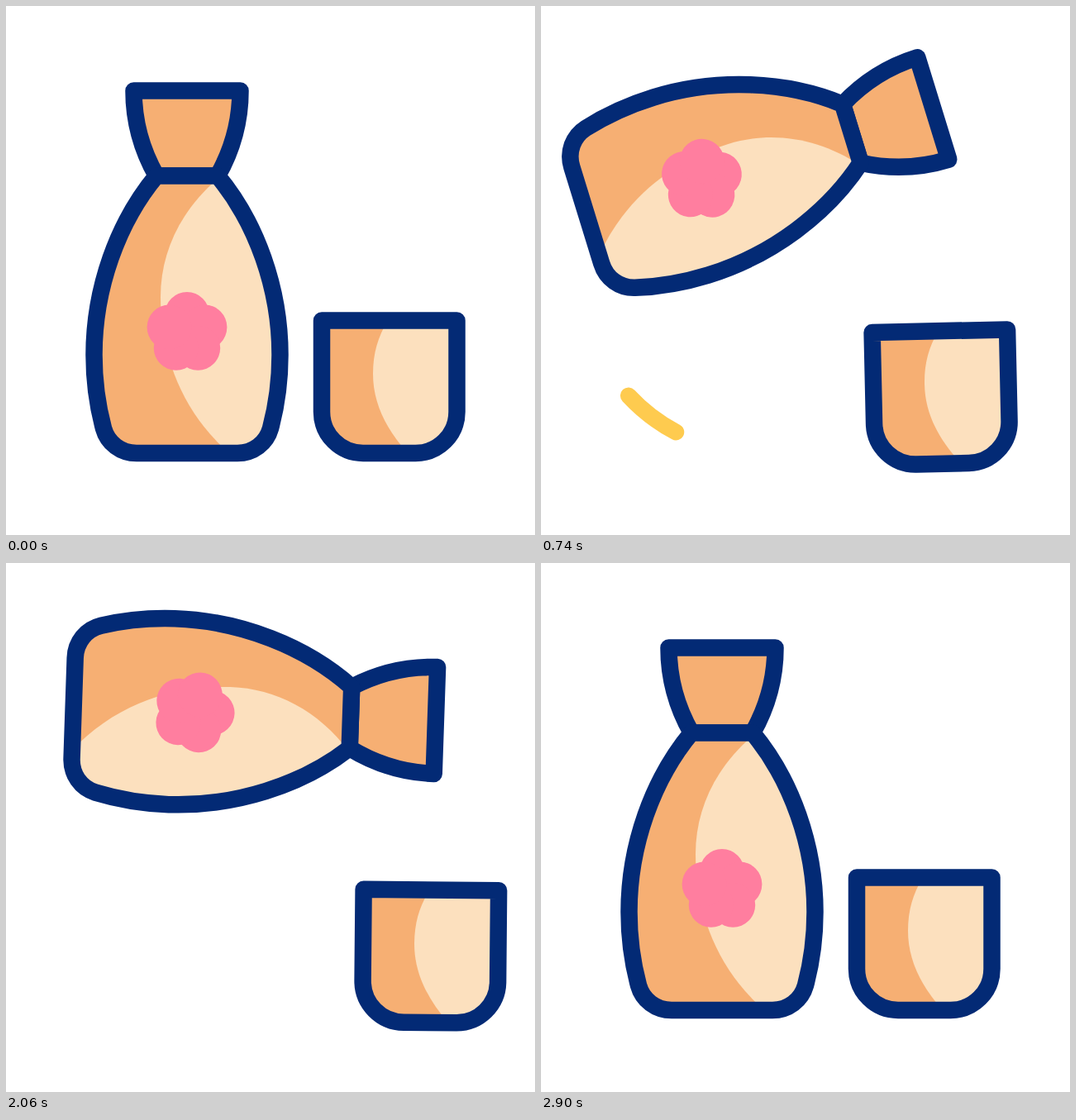
These frames come from a looping animation (640x640 px, 3580 ms). An HTML page:

```html
<!DOCTYPE html>
<html lang="en">
<head>
<meta charset="utf-8">
<title>Sake pour</title>
<style>
  html, body { margin: 0; width: 100%; height: 100%; overflow: hidden; background: #fff; }
  svg { display: block; width: 100%; height: 100%; }
  .line { fill: none; stroke-width: 20; stroke-linecap: round; stroke-linejoin: round; }
  .ink { stroke: #032a75; stroke-width: 20.5; }
  .shade { fill: #f6af73; }
  .light { fill: #fce0be; }
</style>
</head>
<body>
<svg viewBox="0 0 640 640">
  <defs>
    <path id="body" d="M182 205.5C135 262 106.5 342 106.5 422Q106.5 468 118 511C123 529 139 541 158 541H280C299 541 315 529 320 511Q331.5 468 331.5 422C331.5 342 303 262 256 205.5Z"/>
    <path id="bowl" d="M382 380.5H545.5V491a50 50 0 0 1-50 50H432a50 50 0 0 1-50-50Z"/>
    <clipPath id="inBody"><use href="#body"/></clipPath>
    <clipPath id="inBowl"><use href="#bowl"/></clipPath>
  </defs>
  <path id="water" class="line" stroke="#95b2f5" pathLength="1"
    d="M534 243.5C553 243.5 563 285 563 330Q563 390 557 450"/>
  <path id="swoosh" class="line" stroke="#fecb4f"/>
  <g id="bottle">
    <path class="line ink" style="fill:#f6af73" d="M154.5 102.5H283.5Q283.5 157 256 205.5H182Q154.5 157 154.5 102.5Z"/>
    <use href="#body" class="shade"/>
    <path class="light" clip-path="url(#inBody)" d="M260 206C212 245 187 297 187 352C187 424 214 492 270 541H340V206Z"/>
    <g id="flower" fill="#ff7e9f"></g>
    <use href="#body" class="line ink"/>
  </g>
  <g id="cup">
    <use href="#bowl" class="shade"/>
    <path class="light" clip-path="url(#inBowl)" d="M462 380.5C450 400 444 420 444 445C444 478 458 510 486 541H550V380.5Z"/>
    <use href="#bowl" class="line ink"/>
  </g>
</svg>
<script>
const LOOP = 3580;
const $ = id => document.getElementById(id);
const clamp = (v, lo, hi) => Math.min(hi, Math.max(lo, v));
const rad = deg => deg * Math.PI / 180;
const onCircle = (cx, cy, r, deg) => [cx + r * Math.cos(rad(deg)), cy + r * Math.sin(rad(deg))];

// Smooth progress from 0 to 1 between two times.
const ease = (t, from, to) => {
  const p = clamp((t - from) / (to - from), 0, 1);
  return p * p * (3 - 2 * p);
};

// Rise to 1, hold, and return to 0; pulse returns without holding.
const swing = (t, leave, arrive, back, home) => ease(t, leave, arrive) - ease(t, back, home);
const pulse = (t, from, peak, to) => swing(t, from, peak, peak, to);

// Offset and turn a group about its own centre.
function place(id, cx, cy, dx, dy, turn) {
  $(id).setAttribute('transform', `translate(${dx} ${dy}) rotate(${turn} ${cx} ${cy})`);
}

function drawBottle(t) {
  const dx = 95 * swing(t, 420, 1080, 1887, 2621);
  const dy = -139 * swing(t, 205, 815, 2050, 2832);
  const turn = 101 * swing(t, 180, 1040, 1887, 2829);
  place('bottle', 219, 322, dx, dy, turn);
}

function drawCup(t) {
  const dx = 29 * swing(t, 0, 1160, 2090, 2900) + 21 * swing(t, 1440, 2090, 2090, 2900);
  const dy = 36 * pulse(t, 0, 490, 1062) - 21 * pulse(t, 490, 1062, 2060) + 15 * pulse(t, 1062, 2060, 2610);
  const turn = -4.3 * pulse(t, 0, 580, 1060) + 7.2 * swing(t, 580, 1060, 1560, 2160);
  place('cup', 463.75, 460.75, dx, dy, turn);
}

function drawWater(t) {
  const head = ease(t, 1045, 1420), tail = ease(t, 1760, 2100);
  const water = $('water');
  water.style.display = head > tail ? '' : 'none';
  water.setAttribute('stroke-dasharray', `${head - tail} 2`);
  water.setAttribute('stroke-dashoffset', -tail);
}

function drawSwoosh(t) {
  const radius = 215.5;
  const angleAt = time => clamp(137 + 0.1875 * (time - 740), 100, 200);
  const head = angleAt(t), tail = angleAt(t - 103);
  const point = deg => onCircle(264, 325, radius, deg);
  const swoosh = $('swoosh');
  swoosh.style.display = head > tail ? '' : 'none';
  swoosh.setAttribute('d', `M${point(tail)}A${radius} ${radius} 0 0 1 ${point(head)}`);
}

function addPetals(count) {
  for (let i = 0; i < count; i++) {
    const petal = document.createElementNS('http://www.w3.org/2000/svg', 'circle');
    const [x, y] = onCircle(219, 395.5, 22.5, 360 * i / count - 90);
    petal.setAttribute('cx', x);
    petal.setAttribute('cy', y);
    petal.setAttribute('r', 27);
    $('flower').append(petal);
  }
}

addPetals(5);
const start = performance.now();
function tick() {
  const t = (performance.now() - start) % LOOP;
  drawBottle(t);
  drawCup(t);
  drawWater(t);
  drawSwoosh(t);
  requestAnimationFrame(tick);
}
tick();
</script>
</body>
</html>
```
